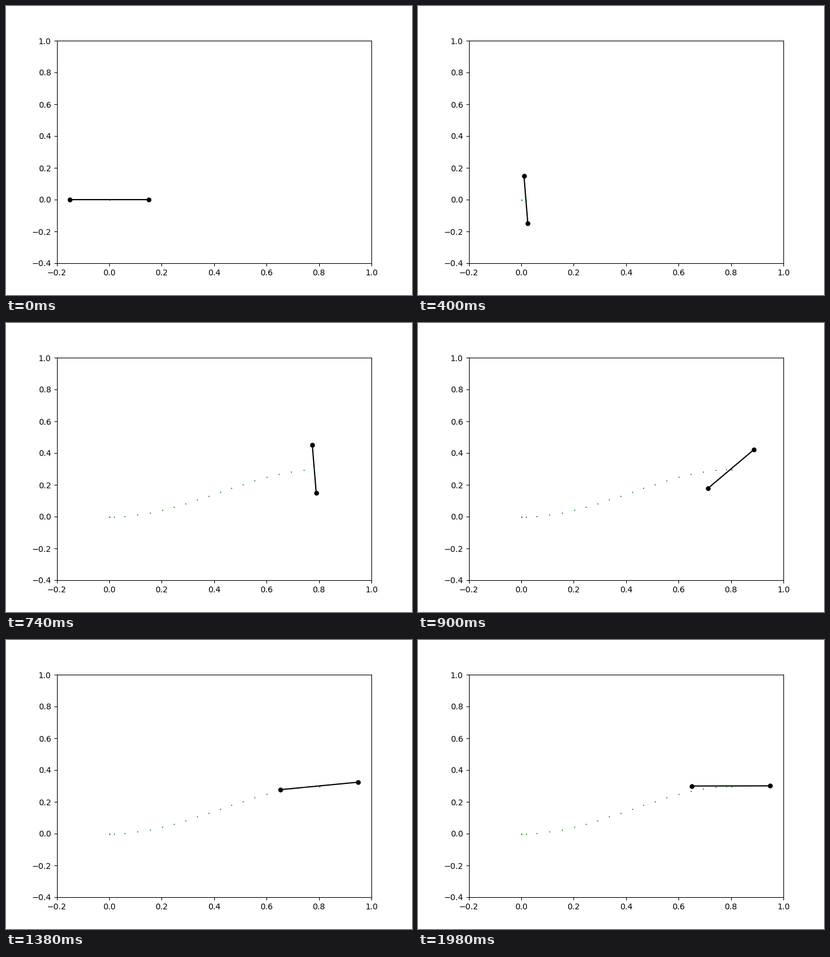
These frames come from a looping animation (700x500 px, 2 s). A matplotlib script:

```python
import numpy as np
import matplotlib.pyplot as plt
from matplotlib.animation import FuncAnimation
from matplotlib.path import Path

FRAMES, STEP_MS = 100, 20
TURN_END, DRIVE_END = 19, 38      # turn in place, drive, turn back
GOAL_X, GOAL_Y = 0.8, 0.3
HALF_AXLE = 0.15
DPI = 100


def drive_table():
    """Fraction of GOAL_X covered after each driving step."""
    speed = np.ones(DRIVE_END - TURN_END)
    speed[[0, -1]] = 0.36
    speed[[1, -2]] = 0.82
    travelled = np.concatenate([[0], np.cumsum(speed)]) / speed.sum()
    u = np.linspace(0, 1, 800)
    ds = np.hypot(GOAL_X * np.diff(u), np.diff(GOAL_Y * u**2 * (3 - 2 * u)))
    arc = np.concatenate([[0], np.cumsum(ds)])
    return np.interp(travelled, arc / arc[-1], u)


DRIVE = drive_table()


def pose(n):
    """Centre and axle angle (radians) at step n."""
    u = DRIVE[min(max(n - TURN_END, 0), len(DRIVE) - 1)]
    x = GOAL_X * u
    y = GOAL_Y * u**2 * (3 - 2 * u) - 0.0065 * np.sin(np.pi * u)**2
    if n < TURN_END:
        angle = np.pi / 2 * (n / TURN_END)**1.37
    elif n < DRIVE_END:
        slope = 6 * GOAL_Y / GOAL_X * u * (1 - u)
        angle = np.pi / 2 + np.arctan(slope)
    else:
        angle = np.radians(91 * np.exp(-0.0712 * (n - DRIVE_END)) - 1)
    return x, y, angle


POSES = np.array([pose(n) for n in range(FRAMES)])

fig, ax = plt.subplots(figsize=(7, 5), dpi=DPI)
ax.set_xlim(-0.2, 1.0)
ax.set_ylim(-0.4, 1.0)

axle, = ax.plot([], [], "ko-", lw=1.5, ms=5)

# Tiny disc centred on a pixel, so repeated dots build up to a small square
radius = 0.97
dot = Path.circle((0.5, -0.5), radius)
trail, = ax.plot([], [], color="g", ls="none", marker=dot, mew=0,
                 ms=2 * (0.5 + radius) * 72 / DPI)


def draw(n):
    x, y, angle = POSES[n]
    dx, dy = HALF_AXLE * np.cos(angle), HALF_AXLE * np.sin(angle)
    axle.set_data([x - dx, x + dx], [y - dy, y + dy])
    trail.set_data(POSES[:n + 1, 0], POSES[:n + 1, 1])
    return axle, trail


anim = FuncAnimation(fig, draw, frames=FRAMES, interval=STEP_MS,
                     repeat=True, repeat_delay=0)
plt.show()
```
